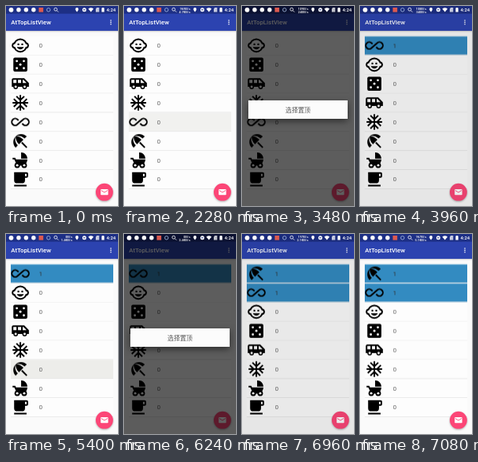
Write an HTML page that moves like this. It is 141x250 px and loops after 8 s.

```html
<!DOCTYPE html>
<html lang="zh">
<head>
<meta charset="utf-8">
<title>AtTopListView</title>
<style>
html, body { margin: 0; width: 100%; height: 100%; overflow: hidden; background: #fafafa; }
svg { display: block; width: 100vw; height: 100vh; --pitch: 23.9px; }
text { font-family: Roboto, "Noto Sans", sans-serif; }

.shift, .infinity, .umbrella, .infinity .on, .infinity .off, .umbrella .on, .umbrella .off,
.press, .dim, .dialog { animation: 8s step-end infinite; }

/* List order */
.shift { animation-name: shift; }
.infinity { animation-name: infinity; }
.umbrella { animation-name: umbrella; }
@keyframes shift {
  0% { transform: none; }
  48% { transform: translateY(var(--pitch)); }
  85.5%, 100% { transform: translateY(calc(2 * var(--pitch))); }
}
@keyframes infinity {
  0% { transform: none; }
  48% { transform: translateY(calc(-4 * var(--pitch))); }
  85.5%, 100% { transform: translateY(calc(-3 * var(--pitch))); }
}
@keyframes umbrella {
  0% { transform: none; }
  85.5%, 100% { transform: translateY(calc(-5 * var(--pitch))); }
}

/* Pinned look */
.on { opacity: 0; }
.infinity .on { animation-name: pinFirst; }
.infinity .off { animation-name: unpinFirst; }
.umbrella .on { animation-name: pinSecond; }
.umbrella .off { animation-name: unpinSecond; }
@keyframes pinFirst { 0% { opacity: 0; } 48%, 100% { opacity: 1; } }
@keyframes unpinFirst { 0% { opacity: 1; } 48%, 100% { opacity: 0; } }
@keyframes pinSecond { 0% { opacity: 0; } 85.5%, 100% { opacity: 1; } }
@keyframes unpinSecond { 0% { opacity: 1; } 85.5%, 100% { opacity: 0; } }

/* Long presses and the dialog they open */
.press { opacity: 0; }
.press.first { animation-name: pressFirst; }
.press.second { animation-name: pressSecond; }
.dim { animation-name: dim; }
.dialog { animation-name: dialog; filter: drop-shadow(0 3.5px 4px rgba(0, 0, 0, .5)); }
@keyframes pressFirst { 0% { opacity: 0; } 28.5% { opacity: 1; } 37.5%, 100% { opacity: 0; } }
@keyframes pressSecond { 0% { opacity: 0; } 67.5% { opacity: 1; } 75%, 100% { opacity: 0; } }
@keyframes dim {
  0% { opacity: 0; }
  37.5% { opacity: .2; } 39% { opacity: .5; } 40.5% { opacity: .63; }
  48% { opacity: .35; } 49.5% { opacity: .08; } 51% { opacity: 0; }
  75% { opacity: .2; } 76.5% { opacity: .5; } 78% { opacity: .63; }
  85.5% { opacity: .35; } 87% { opacity: .08; } 88.5%, 100% { opacity: 0; }
}
@keyframes dialog {
  0% { opacity: 0; }
  37.5% { opacity: .3; } 39% { opacity: .9; } 40.5% { opacity: 1; }
  48% { opacity: .4; } 49.5% { opacity: 0; }
  75% { opacity: .3; } 76.5% { opacity: .9; } 78% { opacity: 1; }
  85.5% { opacity: .4; } 87%, 100% { opacity: 0; }
}

.fab { filter: drop-shadow(0 1px 1px rgba(0, 0, 0, .3)); }
.line { fill: none; stroke: #000; stroke-width: 2; }
.hole { fill: #fdfdfd; }
.count { font-size: 8px; fill: #666; }
.rate { font-size: 4px; font-weight: 500; fill: #fff; }
</style>
</head>
<body>
<svg viewBox="0 0 141 250" preserveAspectRatio="none">
  <defs>
    <linearGradient id="shade" x2="0" y2="1">
      <stop stop-opacity=".2"/><stop offset="1" stop-opacity="0"/>
    </linearGradient>
    <path id="branch" class="line" d="M12 12V2M7 3.6l5 5 5-5"/>
  </defs>

  <rect width="141" height="250" fill="#fafafa"/>
  <rect x="6" y="38" width="129" height="191" fill="#fdfdfd"/>
  <rect class="press first" x="6" y="133.6" width="129" height="23" fill="#f1f1ef"/>
  <rect class="press second" x="6" y="157.5" width="129" height="23" fill="#ededea"/>
  <g id="list"></g>

  <rect y="31" width="141" height="2" fill="url(#shade)"/>
  <rect width="141" height="31" fill="#2c43b0"/>
  <rect width="141" height="9.6" fill="#1d2f85"/>
  <text x="6.3" y="23.1" font-size="7.83" font-weight="500" fill="#fff">AtTopListView</text>
  <g fill="#fff">
    <circle cx="132" cy="18" r=".8"/><circle cx="132" cy="20.4" r=".8"/><circle cx="132" cy="22.8" r=".8"/>
  </g>

  <g class="fab">
    <circle cx="123.9" cy="232.7" r="10.9" fill="#fc4677"/>
    <rect x="119.2" y="229.1" width="9.4" height="7.2" rx=".8" fill="#fff"/>
    <path d="M119.9 230.5l4 2.5 4-2.5" fill="none" stroke="#fc4677" stroke-width=".9"/>
  </g>

  <rect class="dim" width="141" height="250"/>
  <g class="dialog">
    <rect x="8" y="118" width="125" height="23" fill="#fcfcfc"/>
    <text x="70.5" y="132.7" font-size="7.83" text-anchor="middle" fill="#555"
      style="font-family: 'Noto Sans CJK SC', 'Noto Sans CJK', sans-serif">选择置顶</text>
  </g>

  <g fill="#fff">
    <circle cx="6.5" cy="4.8" r="2.9"/>
    <circle cx="15.9" cy="4.8" r="2.7"/>
    <circle cx="25.3" cy="4.8" r="2.7"/>
    <circle cx="34.7" cy="4.8" r="2.7"/>
    <rect x="41.3" y="2" width="5.6" height="5.6" fill="#dc5a50"/>
    <circle cx="53.5" cy="4.8" r="2.2" fill="none" stroke="#a9bfe4" stroke-width=".8"/>
    <path d="M64 5.6l2 2M64.4 4.2a1.9 1.9 0 1 1-3.8 0 1.9 1.9 0 0 1 3.8 0z"
      fill="none" stroke="#fff" stroke-width=".8"/>
    <path d="M89.3 7.6q-2-2.2-2-3.6a2 2 0 0 1 4 0q0 1.400-2 3.600z"/>
    <circle cx="98.600" cy="4.800" r="2.500"/>
    <path d="M97.200 4.800h2.800" stroke="#1d2f85" stroke-width=".9"/>
    <path d="M103.600 3.600q3.300-2.500 6.600 0l-3.300 4z"/>
    <path d="M113 3.400l1.300-1.300h3v5.400H113z" opacity=".75"/>
    <path d="M120.400 2.600h.9V2h1.500v.6h.9v5h-3.300z"/>
    <text x="126.500" y="7" font-size="5.900" font-weight="500">4:24</text>
  </g>
  <g id="rates"></g>
</svg>

<script>
const LOOP = 8000, PITCH = 23.9, TOP = 37.6;
const byId = id => document.getElementById(id);
const disc = (x, y, r, name = "") => `<circle class="${name}" cx="${x}" cy="${y}" r="${r}"/>`;
const dot = (x, y) => disc(x, y, 1.5, "hole");
const wheel = (x, y, r) => disc(x, y, r) + dot(x, y);
const head = (grow, name) =>
  disc(12, 12, 8 + grow, name) + disc(5, 12, 3 + grow, name) + disc(19, 12, 3 + grow, name);

const rows = [
  ["shift", head(1) + head(-1, "hole") + disc(9.5, 10.5, 1.25) + disc(14.5, 10.5, 1.25) +
    `<path d="M7.5 14c.76 1.77 2.5 3 4.5 3s3.74-1.23 4.5-3z"/>`],
  ["shift", `<rect x="3" y="3" width="18" height="18" rx="2"/>` +
    dot(7.5, 7.5) + dot(16.5, 7.5) + dot(12, 12) + dot(7.5, 16.5) + dot(16.5, 16.5)],
  ["shift", `<path fill-rule="evenodd"
    d="M17 5H3Q1 5 1 7v9h22v-5zM3 7h4v4H3zM9 7h4v4H9zM15 7h1l4 4h-5z"/>` +
    wheel(6, 16, 3) + wheel(17.5, 16, 3)],
  ["shift", [0, 90, 180, 270].map(a => `<use href="#branch" transform="rotate(${a} 12 12)"/>`).join("")],
  ["infinity", `<path class="line"
    d="M9.7 10 8.5 8.9A4.38 4.38 0 1 0 8.5 15.1L15.5 8.9A4.38 4.38 0 1 1 15.5 15.1L14.3 14"/>`],
  ["umbrella", `<path d="M13.1 14.6l1.5-1.5 6.4 6.5L19.6 21z
    M17.4 8.8L20.3 6C16.3 2 9.9 2 6 5.9c3.9-1.3 8.3-.2 11.4 2.9z
    M5.9 6C2 9.9 2 16.3 6 20.3l2.8-2.9C5.7 14.3 4.6 9.9 5.9 6z
    M6 6c-.4 3 1.1 6.9 4.3 10l5.7-5.7C12.9 7.1 9 5.6 6 6z"/>`],
  ["", `<path d="M13 2v8h8c0-4.4-3.6-8-8-8zM2 9h3.5l.9 2H21c0 1.8-.6 3.500-1.700 4.900L17 19H8L6.300 15.400 4.200 11H2z"/>` +
    wheel(8, 18.5, 3.5) + wheel(17, 18.5, 3.5)],
  ["", `<path fill-rule="evenodd" d="M20 3H4v10a4 4 0 0 0 4 4h6a4 4 0 0 0 4-4v-3h2a2 2 0 0 0 2-2V5a2 2 0 0 0-2-2z
    M18 5h2v3h-2zM4 19h16v2H4z"/>`]
];

byId("list").innerHTML = rows.map(([name, icon], i) => `
  <g transform="translate(6 ${TOP + i * PITCH})"><g class="${name}">
    <rect class="on" y=".4" width="129" height="23" fill="#338bc1"/>
    <rect y="23.4" width="129" height=".5" fill="#d8d8d8"/>
    <g transform="translate(.3) scale(.98)">${icon}</g>
    <text class="count off" x="35.5" y="14.6">0</text>
    <text class="count on" x="35.5" y="14.6" style="fill:#333">1</text>
  </g></g>`).join("");

// Network speed: start time, upper line, lower line
const rates = [
  [0, "723B/s", "606B/s"], [1080, "480B/s", "312B/s"],
  [2280, "969B/s", "4.7KB/s"], [3240, "169B/s", "248B/s"],
  [3480, "109B/s", "240B/s"], [3960, "108B/s", "340B/s"],
  [4560, "0B/s", "1.2KB/s"], [5400, "0B/s", "1.4KB/s"],
  [5760, "0B/s", "2.4KB/s"], [6480, "197B/s", "2.1KB/s"],
  [7080, "967B/s", "5.1KB/s"]
];
byId("rates").innerHTML = rates.map(([, up, down]) => `
  <g class="rate" text-anchor="end" opacity="0">
    <text x="83.5" y="4.5">${up}</text>
    <text x="83.5" y="8.7">${down}</text>
  </g>`).join("");

[...byId("rates").children].forEach((el, i) => {
  const end = i + 1 < rates.length ? rates[i + 1][0] : LOOP;
  const key = (opacity, time) => ({ opacity, offset: time / LOOP, easing: "step-end" });
  el.animate([key(0, 0), key(1, rates[i][0]), key(0, end), key(0, LOOP)],
    { duration: LOOP, iterations: Infinity });
});
</script>
</body>
</html>
```
